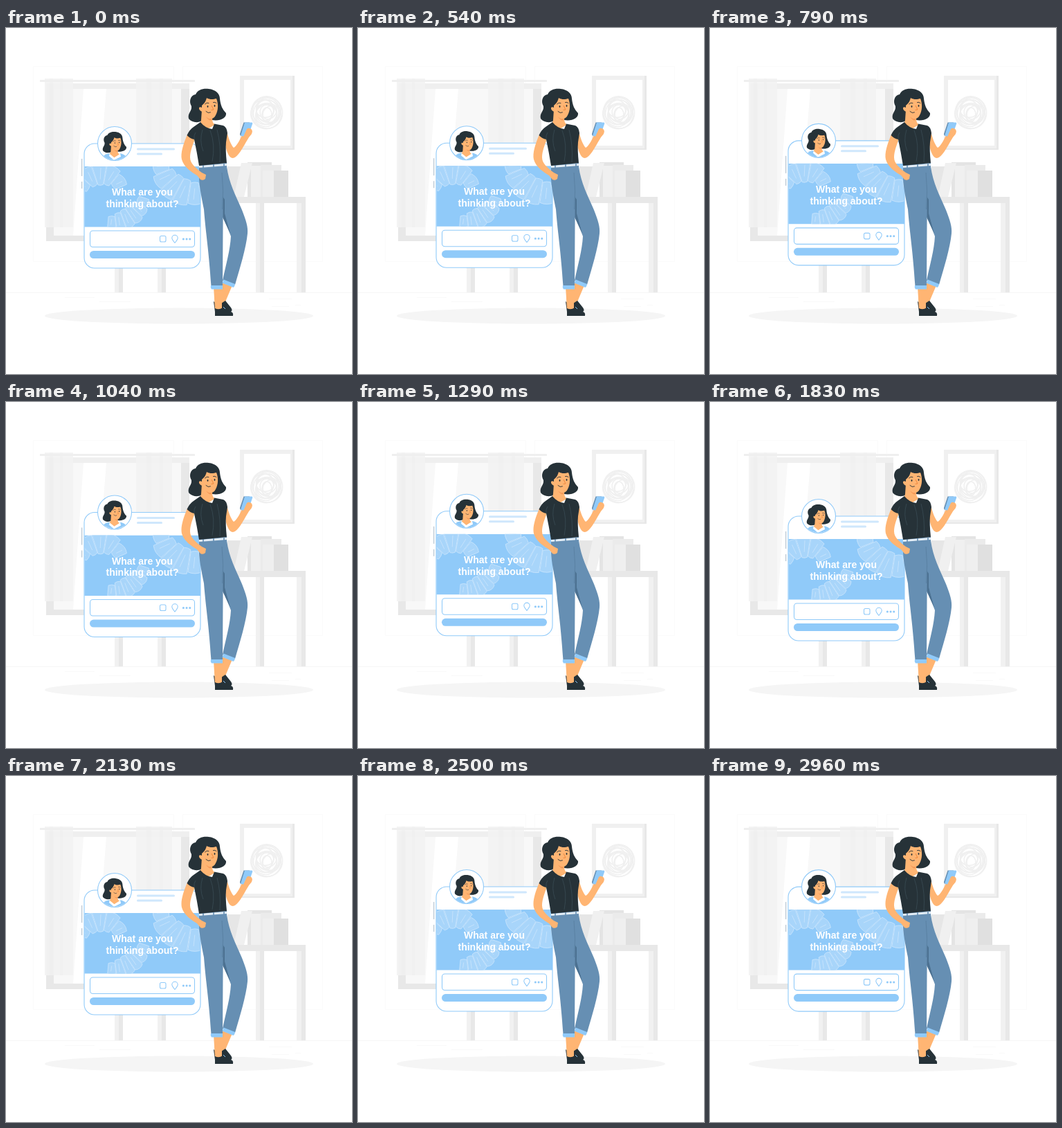
Write an HTML page that moves like this. It is 500x500 px and loops after 3 s.

```html
<!DOCTYPE html>
<html lang="en">
<head>
<meta charset="utf-8">
<style>
  html, body { margin: 0; width: 100%; height: 100%; overflow: hidden; background: #fff; }
  svg { display: block; width: 100%; height: 100%; }
  text { font: bold 14px "Liberation Sans", Arial, sans-serif; fill: #fff; text-anchor: middle; }
  .line { fill: none; stroke: #90caf9; stroke-width: 1.1; }
  .skin { fill: #ffb573; }
  .dark { fill: #263238; }
  .blue { fill: #90caf9; }
  .denim { fill: #668fb3; }
</style>
</head>
<body>
<svg viewBox="0 0 500 500">
  <defs>
    <clipPath id="panelClip"><rect x="113.5" y="200" width="167.5" height="87.5"/></clipPath>
    <clipPath id="avatarClip"><circle cx="157" cy="167" r="23.9"/></clipPath>
    <g id="head">
      <path class="dark" d="M264 131C262 123 269 120 268 113C264 107 266 97 274 96C277 89 285 87 293 88C303 89 309 95 309 102C310 112 313 118 318 123C319 130 309 135 298 133L284 134C276 138 268 136 264 131Z"/>
      <path class="skin" d="M283 118L282 133Q282 136 279 138L290 147L302 139.500Q298 138 298 130Z"/>
      <path class="skin" d="M283 112C287 109 289 105 290 101C295 104 300 103 304 102C307 109 307 119 303 126C300 133 293 132 288 127L284 121C278 120 277 112 283 115Z"/>
      <path d="M289 128.500Q293 132 298 131Q296 137 289 128.500Z" fill="#f28f4f" opacity=".7"/>
      <ellipse class="dark" cx="291.500" cy="113.500" rx=".9" ry="1.4"/>
      <ellipse class="dark" cx="301.500" cy="112.500" rx=".9" ry="1.4"/>
      <path d="M287.500 110Q290 107 293 108.500M299.500 107.500Q302 106.500 304 108.500M289 120.500Q292 124 295.500 122" fill="none" stroke="#263238" stroke-width=".9" stroke-linecap="round"/>
      <path d="M297 112L300 118L296.500 118.500" fill="none" stroke="#ed893e"/>
    </g>
  </defs>

  <g id="room">
    <path d="M39.500 55.500H242.500V337.500H39.500ZM255.500 55.500H457.500V337.500H255.500Z" fill="none" stroke="#fafafa"/>
    <path d="M0 382.500H500" stroke="#f5f5f5"/>
    <path d="M380 391.500H413M418 400.500H426M85 389.500H128M135 395.500H180M384 402.500H409" stroke="#f9f9f9"/>

    <path d="M58 80H265V308H58Z" fill="#e8e8e8"/>
    <path d="M69 80H265V88H69Z" fill="#efefef"/>
    <path d="M69 88H253V300H69Z" fill="#f8f8f8"/>
    <path d="M112 88H145L128 300H97Z" fill="#fff"/>
    <path d="M56 73H97V288H56ZM188 73H240V288H188Z" fill="#f3f3f3" opacity=".88"/>
    <path d="M63 73H68V288H63ZM78 73H82V288H78ZM203 73H210V288H203ZM222 73H227V288H222Z" fill="#ebebeb" opacity=".35"/>
    <path d="M49 75H273V78H49Z" fill="#efefef"/>

    <path d="M338 69H417V176H338Z" fill="#f0f0f0"/>
    <path d="M344 75H411V170H344Z" fill="#fff"/>
    <path d="M414 69H417V176H338V174H414Z" fill="#e8e8e8"/>
    <g id="scribble" fill="none" stroke="#f0f0f0" stroke-width="1.600"/>

    <path d="M320 200H341V244H320Z" fill="#e6e6e6"/>
    <path d="M349 194H384V244H349Z" fill="#e4e4e4"/>
    <path d="M340 195H356L344 244H329Z" fill="#f0f0f0"/>
    <path d="M354 199H368V244H354Z" fill="#f0f0f0"/>
    <path d="M368 198H398V244H368Z" fill="#ebebeb"/>
    <path d="M387 206H408V244H387Z" fill="#e0e0e0"/>
    <path d="M371 206H387V244H371Z" fill="#efefef"/>
    <path d="M157 330H169V382H157ZM219 330H231V382H219ZM361 253H373V382H361ZM420 253H433V382H420Z" fill="#e8e8e8"/>
    <path d="M157 330H163V382H157ZM219 330H225V382H219ZM361 253H367V382H361ZM420 253H427V382H420Z" fill="#f1f1f1"/>
    <path d="M318 244H433V253H318Z" fill="#e8e8e8"/>
    <ellipse cx="250" cy="416" rx="194" ry="11.500" fill="#f5f5f5"/>
  </g>

  <g id="card">
    <path d="M109.700 189V214M109.700 222V232" stroke="#a8b9c8"/>
    <rect x="113" y="167" width="168" height="180" rx="15" fill="#fff"/>
    <g clip-path="url(#panelClip)">
      <rect class="blue" x="113" y="200" width="168" height="88"/>
      <g id="pastries" fill="#a8d5fa" stroke="#c4e2fc"/>
    </g>
    <rect class="line" x="113" y="167" width="168" height="180" rx="15"/>
    <path d="M190.500 175H242.500M190.500 182H224.500" stroke="#cfe7fc" stroke-width="3" stroke-linecap="round"/>
    <text x="197" y="242">What are you</text>
    <text x="197" y="258.800">thinking about?</text>
    <rect class="line" x="121.500" y="293" width="151" height="23.500" rx="4"/>
    <rect class="line" x="222.500" y="300.500" width="8.500" height="8.500" rx="2"/>
    <path class="line" d="M244 310.500C241 307 239.800 305.500 239.800 303.500A4.200 4.200 0 0 1 248.200 303.500C248.200 305.500 247 307 244 310.500Z"/>
    <path d="M256.300 305H256.400M261 305H261.100M265.700 305H265.800" stroke="#90caf9" stroke-width="3" stroke-linecap="round"/>
    <rect class="blue" x="121" y="322" width="152" height="11" rx="5.500"/>
    <circle cx="157" cy="167" r="24.500" fill="#fff"/>
    <g clip-path="url(#avatarClip)">
      <path class="blue" d="M139 187Q143 181 152 181H164Q171 182 175 187V193H139Z"/>
      <path d="M150 180L149 185L156 191L166 186L165 181Z" fill="#fff"/>
      <use href="#head" transform="translate(-26.300 94.600) scale(.63)"/>
    </g>
    <circle class="line" cx="157" cy="167" r="24.500"/>
  </g>

  <g id="woman">
    <path class="skin" d="M314 366L327 372L316 398H304Z"/>
    <path class="dark" d="M300 395Q304 399 311 398L317 394L325 404Q328 408 325 410H302Z"/>
    <path class="skin" d="M300 374H312V407H302Z"/>
    <path class="dark" d="M302 405Q308 408 313 404L327 411Q329 413 328 416H302Z"/>
    <path d="M314 403L317 406" stroke="#90caf9"/>

    <path class="denim" d="M300 202L319 200C322 224 332 242 341 263C347 278 350 288 349 297C347 318 338 347 331 371L313 365C318 341 324 321 325 301C320 287 311 268 300 245Z"/>
    <path d="M311 240L316 248V268L324 297L312 271Z" fill="#4c7191"/>
    <path class="denim" d="M279 203H314L313 373H296.500C293 320 289 300 286 262C283 247 279 228 279 215Z"/>
    <path d="M312 209Q315 235 312.500 262" fill="none" stroke="#577e9f" stroke-width=".8"/>
    <path class="blue" d="M296 372H313V377.500H297Q295 375 296 372ZM314.500 363.500L331 370Q331 373 328.500 375L312.500 368.500Z"/>
    <path class="denim" d="M279 198L319 195V203L279 205Z"/>
    <path d="M279 200.500L319 197.500" stroke="#e4eef7" stroke-width="3"/>
    <path d="M285 198V204M300 197V203M315 196V202" stroke="#668fb3" stroke-width="1.600"/>

    <path class="skin" d="M262 154C256 168 252 181 254 190C257 201 269 209 276 213L281 219Q285 221 288 218L289 212L283 209C274 202 266 196 266 187C266 178 270 169 273 160Z"/>
    <path class="skin" d="M315 152C316 170 320 188 328 188C336 187 344 169 351 158L355 153C357 148 354 144 350 145L341 155C337 164 332 172 329 173C325 169 321 158 319 149Z"/>
    <path class="denim" d="M343.500 136.500H352L347 157L339 155.500Q338 155 338 153Z"/>
    <path class="blue" d="M345 136.500H355Q357 137 356 139L350 156Q349 158 347 157.500L340 156Q339 155 339.500 154Z"/>
    <path class="skin" d="M343 157L348 146Q351 143 355 147Q357 150 353 155L348 160Z"/>

    <use href="#head"/>
    <path class="dark" d="M281 136L271 143Q265 147 261.500 155Q266 160 272 161Q276 180 279 199L319 195Q317 176 318 165L320 152Q319 143 314 141L301 138.500L298 146Q288 145 281 136Z"/>
    <path d="M272 161Q271 155 274 151M284 147Q279 163 285 178M305 147Q311 170 309 194M295 148Q303 169 298 193" fill="none" stroke="#455a64" stroke-width=".5"/>
  </g>
</svg>
<script>
  const byId = id => document.getElementById(id);

  // A tapered arc split into rounded slices.
  function pastry(cx, cy, radius, halfWidth, from, to, slices) {
    const at = (deg, r) => {
      const a = deg * Math.PI / 180;
      return `${(cx + r * Math.cos(a)).toFixed(1)} ${(cy + r * Math.sin(a)).toFixed(1)}`;
    };
    const step = (to - from) / slices;
    let shapes = '';
    for (let i = 0; i < slices; i++) {
      const a = from + i * step, b = a + step * .94, mid = (a + b) / 2;
      const w = halfWidth * (.4 + .6 * Math.sin(Math.PI * (i + .5) / slices));
      shapes += `<path d="M${at(a, radius - w)}L${at(a, radius + w)}Q${at(mid, radius + w + 4)} ${at(b, radius + w)}`
        + `L${at(b, radius - w)}Q${at(mid, radius - w - 2)} ${at(a, radius - w)}Z"/>`
        + `<path d="M${at(mid, radius - w * .5)}L${at(mid + step * .1, radius + w * .6)}"/>`;
    }
    return shapes;
  }

  byId('pastries').innerHTML =
    pastry(138, 242, 31, 15, -165, -22, 5) +
    pastry(272, 190, 49, 18, 60, 178, 6) +
    pastry(152, 230, 50, 13, 18, 96, 6);

  byId('scribble').innerHTML = Array.from({ length: 12 }, (_, i) =>
    `<ellipse cx="${377 + 3 * Math.sin(i * 2)}" cy="${122 + 3 * Math.cos(i * 3)}" rx="${7 + i * 1.4}" ry="${10 + i * 1.2}" transform="rotate(${i * 47} 377 122)"/>`
  ).join('');

  const LOOP = 3000, START = 480, HALF = 750, RISE = 10;
  const card = byId('card');

  function draw(now) {
    const phase = Math.max(0, now % LOOP - START) / HALF % 2;
    const lift = RISE * (1 - Math.abs(1 - phase));
    card.setAttribute('transform', `translate(0 ${-lift})`);
    requestAnimationFrame(draw);
  }
  draw(performance.now());
</script>
</body>
</html>
```
